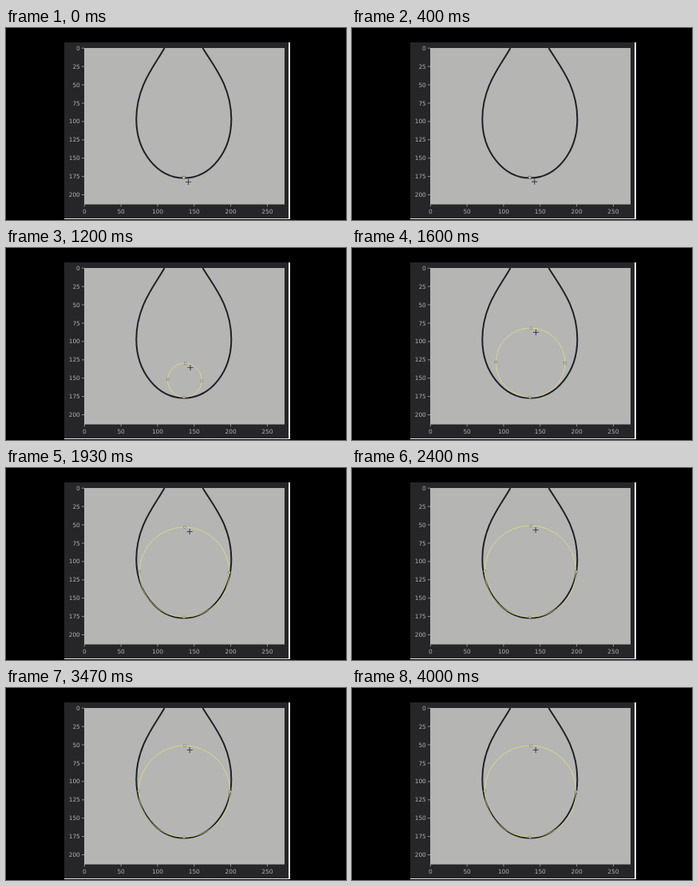
An HTML page for the animation above (4.07 s loop, 426x240 px).

```html
<!DOCTYPE html>
<html>
<head>
<meta charset="utf-8">
<style>
  html, body { margin: 0; width: 100%; height: 100%; overflow: hidden; background: #000; }
  svg { display: block; width: 426px; height: 240px; }
  text { font: 7.4px "DejaVu Sans", sans-serif; fill: #b0b0b0; }
  .tick { stroke: #a8a8a8; stroke-width: .8; }
</style>
</head>
<body>
<svg viewBox="0 0 426 240">
  <rect x="73" y="18" width="282" height="221" fill="#262629"/>
  <path d="M355 18V239" stroke="#f8f8f8" stroke-width="2"/>
  <path d="M73 238.5H356" stroke="#f0f0f0" stroke-width="1"/>
  <g id="axes"></g>
  <rect x="98" y="25" width="251" height="195.5" fill="#b5b5b4"/>
  <path d="M198.5 25C187 46 163.3 72 163.3 114C163.3 155 190 187.5 223 187.5C256 187.5 282.3 155 282.3 114C282.3 72 259 46 246.5 25"
    fill="none" stroke="#202028" stroke-width="2"/>
  <circle id="ring" fill="none" stroke="#e6e472" stroke-width=".9" stroke-opacity=".8"/>
  <g id="handles" fill="#d8d8c4" stroke="#77776c" stroke-width=".6"></g>
  <path id="cursor" d="M-3.5 0H3.5M0 -3.5V3.5" stroke="#45454c" stroke-width="1.1"/>
</svg>
<script>
const NS = "http://www.w3.org/2000/svg";
const LOOP = 4070, STEPS = 61, SCALE = 0.9165;
const BOTTOM = { x: 223, y: 186.5 };
// step, x and y of the dragged top handle
const DRAG = [
  [0, 222.3, 187], [8, 222.5, 186.5], [12, 224.2, 176.3], [18, 224.8, 144],
  [27, 224, 78], [29, 224, 74], [32, 224, 72], [60, 224, 72]
];
const $ = id => document.getElementById(id);

function set(el, attrs) {
  for (const key in attrs) el.setAttribute(key, attrs[key]);
}

function add(parent, tag, attrs, label) {
  const el = document.createElementNS(NS, tag);
  set(el, attrs);
  if (label !== undefined) el.textContent = label;
  parent.appendChild(el);
  return el;
}

for (let v = 0; v <= 250; v += 50) {
  const x = 98.3 + v * SCALE;
  add($("axes"), "path", { d: `M${x} 220V223.3`, class: "tick" });
  add($("axes"), "text", { x, y: 231.6, "text-anchor": "middle" }, v);
}
for (let v = 0; v <= 200; v += 25) {
  const y = 25.2 + v * SCALE;
  add($("axes"), "path", { d: `M94.8 ${y}H98`, class: "tick" });
  add($("axes"), "text", { x: 92.8, y: y + 2.6, "text-anchor": "end" }, v);
}

const handles = Array.from({ length: 4 }, () =>
  add($("handles"), "rect", { width: 2.4, height: 2.4 }));

function topHandle(step) {
  let i = 1;
  while (i < DRAG.length - 1 && DRAG[i][0] < step) i++;
  const [s0, x0, y0] = DRAG[i - 1], [s1, x1, y1] = DRAG[i];
  const k = (step - s0) / (s1 - s0);
  return { x: x0 + (x1 - x0) * k, y: y0 + (y1 - y0) * k };
}

function draw(now) {
  // steps start on times rounded to 10 ms, so allow a little early
  const step = Math.floor((now % LOOP) / LOOP * STEPS + 0.1);
  const top = topHandle(Math.min(step, STEPS - 1));
  const cx = (top.x + BOTTOM.x) / 2, cy = (top.y + BOTTOM.y) / 2;
  const dx = top.x - cx, dy = top.y - cy;
  set($("ring"), { cx, cy, r: Math.hypot(dx, dy) });
  const spots = [[dx, dy], [-dy, dx], [-dx, -dy], [dy, -dx]];
  spots.forEach(([x, y], i) =>
    set(handles[i], { x: cx + x - 1.2, y: cy + y - 1.2 }));
  set($("cursor"), { transform: `translate(${top.x + 6.2} ${top.y + 5.5})` });
}

const start = performance.now();
function tick() {
  draw(performance.now() - start);
  requestAnimationFrame(tick);
}
tick();
</script>
</body>
</html>
```
